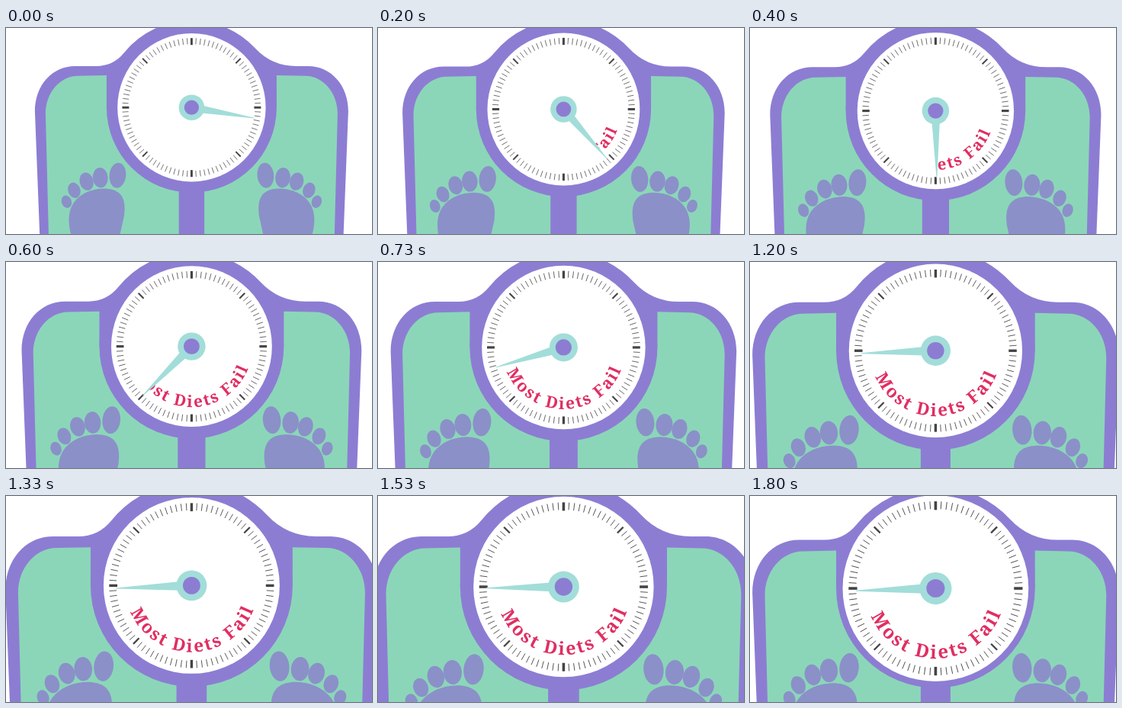
Animation of 480x270 px, one loop 1.87 s. Source, as an HTML page with a canvas:

```html
<!DOCTYPE html>
<html lang="en">
<head>
<meta charset="utf-8">
<title>Bathroom scale</title>
<style>
  html, body { margin: 0; width: 100%; height: 100%; overflow: hidden; background: #fff; }
  canvas { display: block; width: 480px; height: 270px; }
</style>
</head>
<body>
<canvas id="stage" width="480" height="270"></canvas>
<script>
const ctx = document.getElementById('stage').getContext('2d');
const LOOP = 1870, FPS = 15, LAST = 27;
const TAU = Math.PI * 2, DEG = Math.PI / 180;
const PURPLE = '#8c7dd3', GREEN = '#8bd6b8', FOOT = '#8b90c9';
const TEAL = '#a2ddd9', RED = '#e02e62', INK = '#444';
const LABEL = 'Most Diets Fail';
const RIM = 114, RING = 111.5, TOP = -54.3;

// needle keys: step, degrees clockwise from the right
const SWING = [[0, 9.6], [6, 89], [11, 163.7], [13.5, 186], [15, 183.8], [18, 178], [23, 179], [27, 178.3]];
// toes of the left foot: x, y, rx, ry, tilt
const TOES = [
  [-97, 89, 10.8, 16.5, 0.1], [-119.7, 92, 9.9, 13.2, -0.08], [-137.8, 97, 9, 11.8, -0.25],
  [-154, 108.5, 8, 10.3, -0.35], [-164, 123.5, 6.5, 8.4, -0.35]
];

function slope(i) {
  const a = SWING[Math.max(i - 1, 0)], b = SWING[Math.min(i + 1, SWING.length - 1)];
  return (b[1] - a[1]) / (b[0] - a[0]);
}

function needleAngle(n) {
  let i = 0;
  while (i < SWING.length - 2 && n >= SWING[i + 1][0]) i++;
  const [x0, y0] = SWING[i], [x1, y1] = SWING[i + 1];
  const w = x1 - x0, u = (n - x0) / w, v = 1 - u;
  return y0 * (1 + 2 * u) * v * v + slope(i) * w * u * v * v
       + y1 * u * u * (3 - 2 * u) - slope(i + 1) * w * u * u * v;
}

function shape(color, path) {
  ctx.fillStyle = color;
  ctx.beginPath();
  path();
  ctx.fill();
}

const disc = (r, color) => shape(color, () => ctx.arc(0, 0, r, 0, TAU));

// join: angle on the rim where the shoulder curve meets it
function halfBody(join) {
  const c = Math.cos(join), s = Math.sin(join);
  const reach = (TOP + RIM * s) / c;
  const bend = -RIM * c - reach * s;
  shape(PURPLE, () => {
    ctx.moveTo(0.5, 185);
    ctx.lineTo(-198.5, 185);
    ctx.lineTo(-205.5, 5);
    ctx.bezierCurveTo(-205.5, -29, -183, TOP, -153, TOP);
    ctx.lineTo(bend - reach, TOP);
    ctx.quadraticCurveTo(bend, TOP, -RIM * c, -RIM * s);
    ctx.arc(0, 0, RIM, Math.PI + join, Math.PI * 1.5 + 0.01);
  });
  shape(GREEN, () => {
    ctx.moveTo(0, 185);
    ctx.lineTo(-187, 185);
    ctx.lineTo(-191.5, 8);
    ctx.bezierCurveTo(-191.5, -19, -173, -41.3, -149, -41.5);
    ctx.lineTo(-111, -42.3);
    ctx.lineTo(0, -42.3);
  });
  for (const [x, y, rx, ry, tilt] of TOES) {
    shape(FOOT, () => ctx.ellipse(x, y, rx, ry, tilt, 0, TAU));
  }
  shape(FOOT, () => {
    ctx.moveTo(-152, 185);
    ctx.bezierCurveTo(-163, 158, -164, 138, -154, 124);
    ctx.bezierCurveTo(-146, 113, -131, 106.5, -115, 106.3);
    ctx.bezierCurveTo(-95, 106.5, -85, 116, -88.5, 142);
    ctx.lineTo(-98, 185);
  });
}

function drawBody() {
  halfBody(39 * DEG);
  ctx.save();
  ctx.scale(-1, 1);
  halfBody(43 * DEG);
  ctx.restore();
  ctx.fillStyle = PURPLE;
  ctx.fillRect(-RING, -45, RING * 2, 45);
  ctx.fillRect(-16.7, 0, 33.4, 185);
  disc(RING, PURPLE);
}

function drawTicks() {
  ctx.strokeStyle = INK;
  for (let i = 0; i < 96; i++) {
    const a = i * TAU / 96, c = Math.cos(a), s = Math.sin(a);
    ctx.lineWidth = i % 24 === 0 ? 2.9 : i % 12 === 0 ? 1.9 : 0.75;
    const inner = i % 12 === 0 ? 82 : 83;
    ctx.beginPath();
    ctx.moveTo(c * inner, s * inner);
    ctx.lineTo(c * 91, s * 91);
    ctx.stroke();
  }
}

// the needle wipes the label in from the right
function drawLabel(angle) {
  const radius = 73.4, gap = 2.15;
  ctx.save();
  ctx.beginPath();
  ctx.moveTo(0, 0);
  ctx.arc(0, 0, 96, 0, angle);
  ctx.clip();
  ctx.rotate(-0.9 * DEG);
  ctx.font = 'bold 19.2px "Noto Serif", serif';
  ctx.textAlign = 'center';
  ctx.fillStyle = RED;
  const widths = [...LABEL].map(ch => ctx.measureText(ch).width);
  const total = widths.reduce((sum, w) => sum + w + gap, -gap);
  let x = -total / 2;
  widths.forEach((w, i) => {
    ctx.save();
    ctx.rotate(-(x + w / 2) / radius);
    ctx.fillText(LABEL[i], 0, radius);
    ctx.restore();
    x += w + gap;
  });
  ctx.restore();
}

function drawNeedle(angle) {
  ctx.save();
  ctx.rotate(angle);
  shape(TEAL, () => {
    ctx.moveTo(12, -5);
    ctx.lineTo(83.5, -0.4);
    ctx.lineTo(83.5, 0.4);
    ctx.lineTo(12, 5);
  });
  ctx.restore();
  disc(16.8, TEAL);
  disc(9.6, PURPLE);
}

function draw(n) {
  const zoom = 1 + 0.0094 * n;
  // the body pulls back at the end while the dial keeps growing
  const bodyZoom = n <= 24 ? zoom : 1.2256 - (n - 24) * 0.0188;
  const angle = needleAngle(n) * DEG;
  const y = 104.2 + 0.76 * n - 0.005 * n * n;
  const place = z => ctx.setTransform(z, 0, 0, z, 243.4, y);

  ctx.setTransform(1, 0, 0, 1, 0, 0);
  ctx.fillStyle = '#fff';
  ctx.fillRect(0, 0, 480, 270);
  place(bodyZoom);
  drawBody();
  place(zoom);
  disc(97.2, '#fff');
  drawTicks();
  drawLabel(angle);
  drawNeedle(angle);
}

const start = performance.now();
function tick() {
  const t = (performance.now() - start) % LOOP;
  draw(Math.min(LAST, Math.floor((t + 5) * FPS / 1000)));
  requestAnimationFrame(tick);
}
tick();
</script>
</body>
</html>
```
